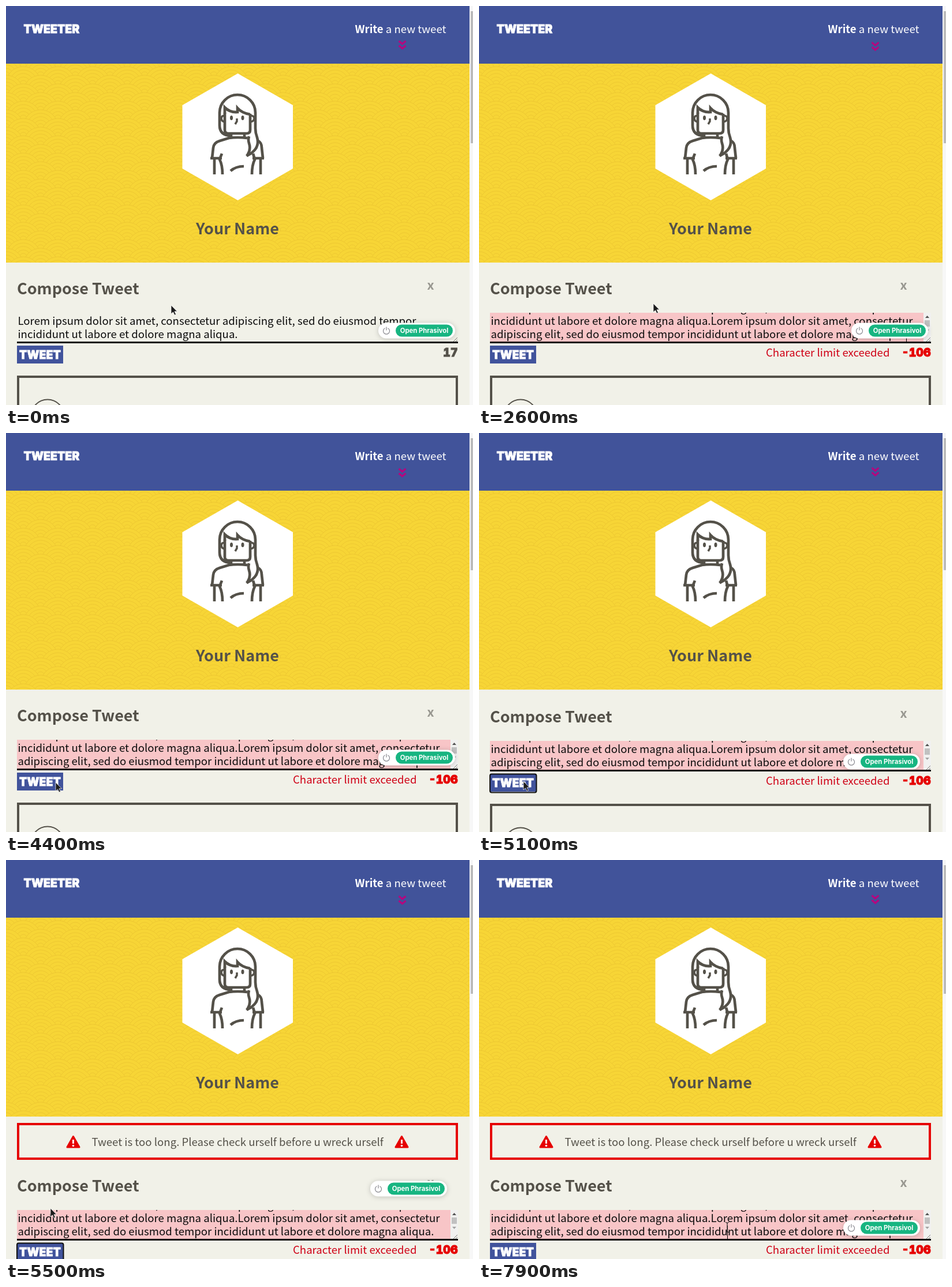
Write an HTML page that moves like this. It is 809 px wide and 692 px high and loops after 8000 ms.

```html
<!DOCTYPE html>
<html lang="en">
<head>
<meta charset="utf-8">
<title>Compose box demo</title>
<style>
html, body { margin: 0; width: 100%; height: 100%; overflow: hidden; background: #f1f1e8; }
svg { display: block; }
text { font: 18.6px "Noto Sans CJK JP", "Noto Sans CJK SC", "Noto Sans CJK", "Noto Sans", sans-serif; fill: #545149; white-space: pre; }
.title { font-size: 27px; font-weight: 600; }
.chunky { font: 900 19.5px Inter, Roboto, sans-serif; font-variant-numeric: tabular-nums; fill: #fff; stroke: #fff; stroke-width: .8; }
.dark { fill: #545149; stroke: #545149; }
.red { fill: #e60000; stroke: #e60000; }
.input text { fill: #0c0c0c; }
.line { fill: none; stroke: #545149; stroke-width: 4.7; }
.end { text-anchor: end; }
.mid { text-anchor: middle; }
</style>
</head>
<body>
<svg width="809" height="692" viewBox="0 0 809 692">
  <defs>
    <pattern id="waves" width="60" height="30" patternUnits="userSpaceOnUse"></pattern>
    <clipPath id="area"><rect x="19" y="532" width="764" height="51"/></clipPath>
    <g id="warn">
      <path d="M0-9.500 10.500 9H-10.500Z" fill="#e60000" stroke="#e60000" stroke-width="3" stroke-linejoin="round"/>
      <path d="M0-4V3" stroke="#fff" stroke-width="3"/>
      <circle cy="6.500" r="1.800" fill="#fff"/>
    </g>
  </defs>
  <rect width="809" height="692" fill="#f1f1e8"/>

  <!-- error banner -->
  <svg id="error" x="0" width="809">
    <text x="148.500" y="40">Tweet is too long. Please check urself before u wreck urself</text>
    <use href="#warn" x="116.500" y="33"/>
    <use href="#warn" x="685.500" y="33"/>
    <rect id="errorBox" x="21" y="2" width="760" fill="none" stroke="#e60000" stroke-width="4"/>
  </svg>

  <!-- compose form and first tweet -->
  <g id="form">
    <text class="title" x="19" y="500">Compose Tweet</text>
    <text class="mid" x="735.500" y="491.500" style="font-size:21.500px;font-weight:700;fill:#989790">x</text>
    <g class="input" clip-path="url(#area)">
      <g id="short">
        <text x="20.500" y="553">Lorem ipsum dolor sit amet, consectetur adipiscing elit, sed do eiusmod tempor</text>
        <text x="20.500" y="576">incididunt ut labore et dolore magna aliqua.</text>
      </g>
      <g id="long">
        <rect x="19" y="532" width="752" height="51" fill="#f8c5c7"/>
        <text x="20.500" y="530">Lorem ipsum dolor sit amet, consectetur adipiscing elit, sed do eiusmod tempor</text>
        <text x="20.500" y="553">incididunt ut labore et dolore magna aliqua.Lorem ipsum dolor sit amet, consectetur</text>
        <text x="20.500" y="576">adipiscing elit, sed do eiusmod tempor incididunt ut labore et dolore magna aliqua.</text>
        <rect x="770" y="532" width="13" height="51" fill="#f1f1f0"/>
        <path d="M773 541l3.500-4 3.500 4Z" fill="#505050"/>
        <rect x="772" y="545" width="9" height="11" fill="#c1c1c1"/>
        <path d="M773 561l3.500 4 3.500-4Z" fill="#a3a3a3"/>
      </g>
      <path d="M775 582l7-7M779 582l3-3" stroke="#77776f"/>
      <rect id="caret" width="1" height="23" y="559" fill="#000"/>
    </g>
    <rect x="19" y="582" width="764" height="3" fill="#080808"/>
    <rect x="19" y="589" width="80" height="31" fill="#41539c"/>
    <rect id="ring" x="19" y="589.500" width="80.500" height="32" rx="3" fill="none" stroke="#101010" stroke-width="2"/>
    <text class="chunky mid" x="59" y="612">TWEET</text>
    <text id="left" class="chunky dark end" x="782.500" y="608">17</text>
    <g id="over">
      <text x="497" y="608" style="fill:#cf0015">Character limit exceeded</text>
      <text class="chunky red end" x="782.500" y="608">-106</text>
    </g>
    <rect x="21" y="643" width="760" height="300" fill="none" stroke="#545149" stroke-width="4"/>
    <circle cx="72" cy="711" r="28.500" fill="none" stroke="#545149" stroke-width="2"/>
  </g>

  <!-- header and profile -->
  <rect width="803" height="100" fill="#41539a"/>
  <text class="chunky" x="30.500" y="46.500">TWEETER</text>
  <text class="end" x="762.500" y="47" style="fill:#fff"><tspan font-weight="600">Write</tspan> a new tweet</text>
  <path id="arrows" d="M-6-7 0-2 6-7M-6 1 0 6 6 1" fill="none" stroke="#b5067f" stroke-width="3.200"/>
  <rect y="100" width="803" height="345" fill="url(#waves)"/>
  <path d="M401.500 117 497 172V282L401.500 337 305.500 282V172Z" fill="#fff"/>
  <g class="line">
    <path d="M389 225Q370 224 370 207V185A31 31 0 0 1 432 185V212Q432 220 435 228Q441 248 417 260Q425 250 421 238Q419 232 421 226"/>
    <path d="M379 185V215Q379 221 385 221H417Q423 221 423 215V187"/>
    <path d="M379 187V176Q388 185 401 184V177Q409 186 423 188"/>
    <path d="M379 190Q373 190 373 195T379 201M423 190Q430 190 430 195T423 201" stroke-width="3.500"/>
    <path d="M400 195V200L397 205" stroke-width="3.500"/>
    <path d="M390 221V228M413 221V228M357 264 359 246Q360 237 370 234L386 229Q401 227 418 229M437 234Q443 237 443 246L445 264"/>
    <path d="M354 264H374M427 264H447M361 264V292M374 256 370 266Q375 276 375 292M441 264V292M428 256 431 266Q426 276 426 292"/>
    <path d="M389 286Q398 278 412 278"/>
  </g>
  <g fill="#545149"><ellipse cx="390.500" cy="194" rx="2.500" ry="4"/><ellipse cx="410" cy="194" rx="2.500" ry="4"/></g>
  <text class="title mid" x="401" y="396">Your Name</text>

  <!-- page scrollbar -->
  <rect x="803" width="6" height="692" fill="#f7f7f7"/>
  <rect id="thumb" x="805" y="9" width="4" fill="#bcbcbc"/>

  <!-- floating helper button -->
  <g id="helper">
    <rect width="133" height="27" rx="13.500" fill="#fff" style="filter:drop-shadow(0 1px 4px #0003)"/>
    <path d="M11.500 9.200A5.500 5.500 0 1 0 16.500 9.200M14 7V13" fill="none" stroke="#85858c" stroke-width="1.200"/>
    <rect x="30" y="3" width="99" height="21" rx="10.500" fill="#17b581"/>
    <text class="mid" x="79.500" y="17.500" style="font:700 11.300px Inter,Arial,sans-serif;fill:#fff">Open Phrasivol</text>
  </g>

  <path id="arrow" d="M0 0V15L3.500 11.800 6 17 8.500 16 6 10.800H10.500Z" fill="#1b1b1b" stroke="#fff" stroke-width=".7"/>
  <path id="beam" d="M-3-8.500Q0-8.500 0-6.500Q0-8.500 3-8.500M0-7V7M-3 8.500Q0 8.500 0 6.500Q0 8.500 3 8.500" fill="none" stroke="#222" stroke-width="1.200"/>
</svg>
<script>
const LOOP = 8000, PASTE = 1050, SUBMIT = 5000, SLIDE = 5055, REFOCUS = 7400;
const el = id => document.getElementById(id);
const show = (id, on) => { el(id).style.display = on ? '' : 'none'; };
const move = (id, x, y) => el(id).setAttribute('transform', `translate(${x} ${y})`);
const clamp = v => Math.max(0, Math.min(1, v));
const swing = p => .5 - Math.cos(Math.PI * clamp(p)) / 2;

// Overlapping rows of concentric rings, lower rows on top
let rings = '<rect width="60" height="30" fill="#f7d536"/>';
for (let row = 0; row < 5; row++) {
  for (let x = row % 2 * 30 - 60; x <= 120; x += 60) {
    for (let r = 30; r > 4; r -= 6) {
      rings += `<circle cx="${x}" cy="${row * 15}" r="${r}" fill="#f7d536" stroke="#eec830"/>`;
    }
  }
}
el('waves').innerHTML = rings;

// time, x, y of the pointer
const path = [[0, 286, 519], [800, 286, 519], [1100, 300, 516], [1900, 300, 516], [2100, 302, 516],
  [3700, 302, 516], [4200, 86, 606], [4600, 86, 606], [4900, 77, 604], [6500, 77, 604], [7200, 430, 637], [8000, 430, 637]];

function pointer(t) {
  const i = path.findIndex(k => k[0] > t);
  const [a, b] = [path[i - 1], path[i]];
  const p = swing((t - a[0]) / (b[0] - a[0]));
  return [a[1] + (b[1] - a[1]) * p, a[2] + (b[2] - a[2]) * p];
}

function caretState(t) {
  if (t < PASTE) return [401, t > 300 && t < 900];
  if (t < SUBMIT) return [740, (t - 1150 + 1200) % 1200 < 600];
  return [430, t >= REFOCUS && (t - REFOCUS) % 1200 < 600];
}

function draw(t) {
  const open = swing((t - SLIDE) / 400);
  const margin = Math.round(11 * open), height = Math.round(64 * open);
  const shift = margin + height;
  const pasted = t >= PASTE;

  move('arrows', 686.5, 68.75 - 1.4 * Math.cos(2 * Math.PI * (t / 1000 - .13)));
  move('form', 0, shift);
  show('error', height > 4);
  el('error').setAttribute('y', 445 + margin);
  el('error').setAttribute('height', height);
  el('errorBox').setAttribute('height', Math.max(0, height - 4));
  el('thumb').setAttribute('height', 229 - 6 * open);

  show('short', !pasted);
  show('left', !pasted);
  show('long', pasted);
  show('over', pasted);
  show('ring', t >= SUBMIT && t < REFOCUS);

  const [caretX, caretOn] = caretState(t);
  el('caret').setAttribute('x', caretX);
  show('caret', caretOn);

  // The helper follows the input late
  if (t < 5100) move('helper', 645, 549.5);
  else move('helper', 631, t < 5800 ? 556.5 : 624.5);

  const [x, y] = pointer(t);
  const overInput = y > 532 + shift && y < 583 + shift;
  show('beam', overInput);
  show('arrow', !overInput);
  move(overInput ? 'beam' : 'arrow', x, y);
}

const start = performance.now();
function tick() {
  draw((performance.now() - start) % LOOP);
  requestAnimationFrame(tick);
}
tick();
</script>
</body>
</html>
```
